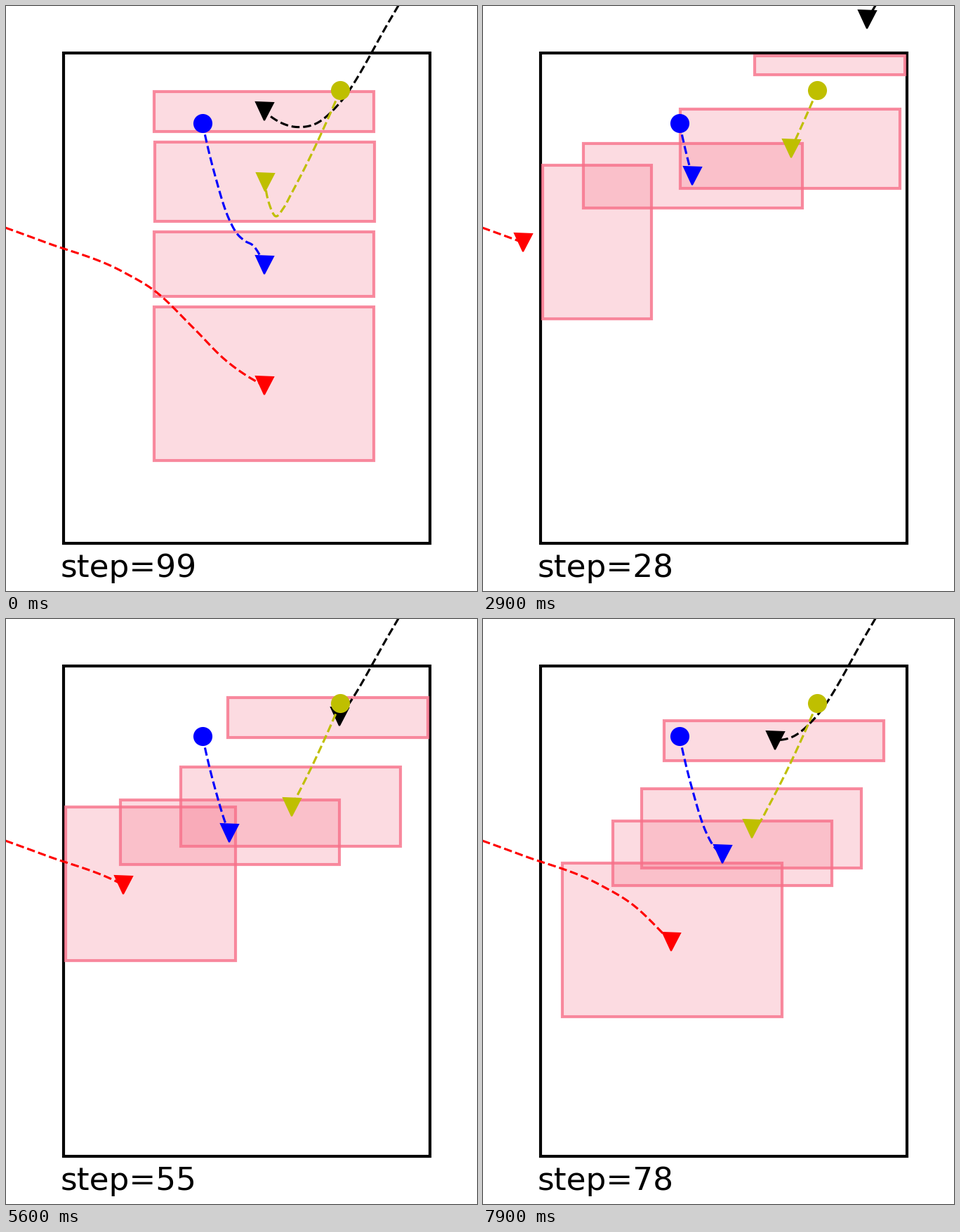
Recreate the animation shown at these times as a matplotlib script. Size 671 by 834 pixels, loop 8 s.

```python
import numpy as np
import matplotlib.pyplot as plt
from matplotlib.animation import FuncAnimation
from matplotlib.patches import Rectangle

W, H, DPI = 671, 834, 128
PT = 150 / DPI                      # line and font sizes are meant for 150 dpi
STEPS = np.arange(100)
FRAMES, INTERVAL = 80, 100
LEFT, RIGHT, TOP = 85, 601, 71      # visible area for boxes
PINK = (0.968, 0.441, 0.536)
KEYS = np.array([0, 28, 55, 66, 78, 88, 99.0])


def curve(v):
    """Smooth cubic through the key values, sampled at every step."""
    v = np.array(v, float)
    m = np.gradient(v, KEYS, edge_order=2)
    i = np.clip(np.searchsorted(KEYS, STEPS, side="right") - 1, 0, len(v) - 2)
    h = KEYS[i + 1] - KEYS[i]
    t = (STEPS - KEYS[i]) / h
    return ((1 + 2 * t) * (1 - t) ** 2 * v[i] + t * (1 - t) ** 2 * h * m[i]
            + t * t * (3 - 2 * t) * v[i + 1] + t * t * (t - 1) * h * m[i + 1])


class Track:
    """A target moving along a smooth path, with a box around it."""

    def __init__(self, ax, color, size, xs, ys):
        self.x, self.y = curve(xs), curve(ys)
        self.size = size
        self.box = ax.add_patch(Rectangle(
            (0, 0), 1, 1, lw=2 * PT, fc=(*PINK, 0.25), ec=(*PINK, 0.8)))
        self.start, = ax.plot(self.x[:1], self.y[:1], "o", color=color,
                              ms=12 * PT, mew=PT)
        self.path, = ax.plot([], [], "--", color=color, lw=1.5 * PT)
        self.head, = ax.plot([], [], "v", color=color, ms=12 * PT, mew=PT)

    def update(self, step):
        x, y = self.x[step], self.y[step]
        self.path.set_data(self.x[:step + 1], self.y[:step + 1])
        self.head.set_data([x], [y])
        # boxes use a slightly smaller grid; centres stay in the area
        w, h = self.size
        cx = np.clip(x + 0.02 * (344 - x), LEFT - 2, RIGHT + 1)
        cy = max(y + 0.01 * (225 - y), TOP - 1.5)
        x0, x1 = max(cx - w / 2, LEFT), min(cx + w / 2, RIGHT)
        y0, y1 = max(cy - h / 2, TOP), cy + h / 2
        self.box.set_bounds(x0, y0, x1 - x0, y1 - y0)


fig = plt.figure(figsize=(W / DPI, H / DPI), dpi=DPI, facecolor="white")
ax = fig.add_axes([0, 0, 1, 1])
ax.set(xlim=(0, W), ylim=(H, 0))
ax.axis("off")

ax.add_patch(Rectangle((82, 67), 522, 699, fill=False, ec="k", lw=2 * PT))
label = ax.text(78, 814, "", family="DejaVu Sans", size=21.8 * PT,
                va="baseline")

tracks = [
    Track(ax, "r", (313.5, 219),
          (-50.6, 57.3, 167.2, 214.3, 268.2, 314, 368.2),
          (298.5, 337.3, 379.3, 408, 460.2, 506, 541.3)),
    Track(ax, "b", (312.5, 92),
          (280, 298, 318.4, 328.4, 340.8, 353.5, 368.2),
          (167.2, 242.3, 305.3, 323.6, 335.2, 343, 369.3)),
    Track(ax, "k", (312.5, 57),
          (624.5, 547.3, 474.6, 445.8, 416, 393, 368.2),
          (-115, 19.3, 139.2, 165.4, 172.6, 167, 150)),
    Track(ax, "y", (313.5, 113),
          (476.2, 439.2, 406.5, 395.2, 383.2, 374, 369.2),
          (120.2, 203, 267.6, 288.2, 299.3, 279, 251.2)),
]


def draw(frame):
    step = (frame - 1) % len(STEPS)
    for track in tracks:
        track.update(step)
    label.set_text(f"step={step}")
    return []


anim = FuncAnimation(fig, draw, frames=FRAMES, interval=INTERVAL,
                     repeat=True, repeat_delay=0, blit=False)
plt.show()
```
